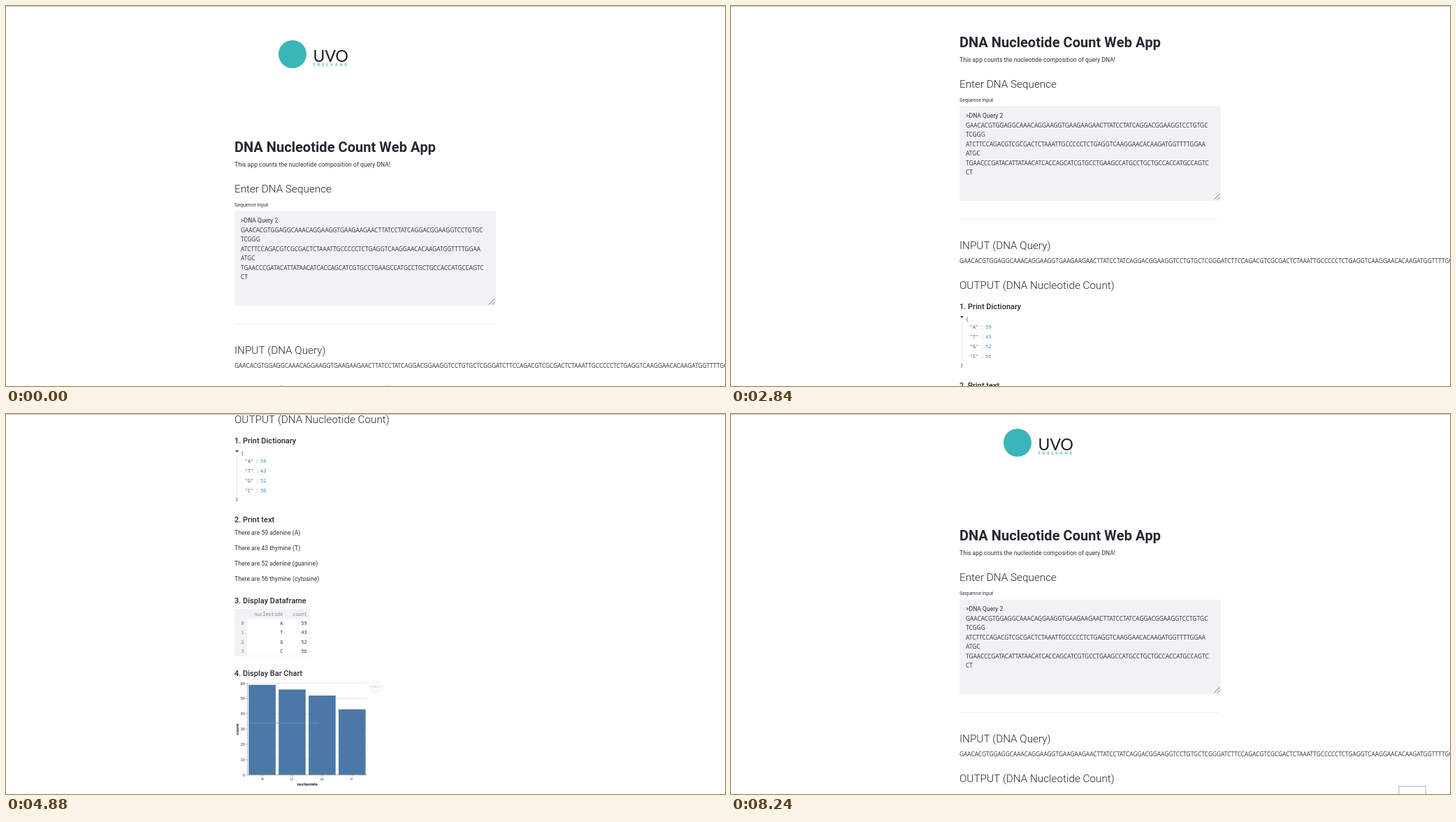
An HTML page that plays this animation: 1029 by 544 pixels, repeating every 8300 ms.

```html
<!DOCTYPE html>
<html lang="en">
<head>
<meta charset="utf-8">
<title>DNA Nucleotide Count Web App</title>
<style>
  html, body { margin: 0; width: 100%; height: 100%; overflow: hidden; background: #fff; }
  svg { display: block; width: 1029px; height: 544px; }
  text { font: 8.57px Roboto, sans-serif; fill: #30313a; font-kerning: none; white-space: pre; }
  .h1 { font-size: 20px; font-weight: 700; letter-spacing: .04px; fill: #262730; }
  .h2 { font-size: 15.3px; font-weight: 300; fill: #262730; }
  .h3 { font-size: 10.9px; font-weight: 500; letter-spacing: .05px; fill: #262730; }
  .label { font-size: 7.05px; }
  .seq { font: 8.33px "Open Sans", sans-serif; }
  .p { letter-spacing: .03px; }
  .mono { font: 6.86px "Noto Sans Mono", monospace; }
  .dim { fill: #7d828c; }
  .key { fill: #4d5358; }
  .num { font: 7.2px "Noto Sans Mono", monospace; }
  .axis { font: 5.4px "Liberation Sans", Arial, sans-serif; fill: #222; }
  .axisTitle { font: bold 5.9px "Liberation Sans", Arial, sans-serif; fill: #111; }
  .brand { font: 23px Lato, sans-serif; fill: #1d1d1f; }
  .tag { font: bold 5.6px Lato, sans-serif; fill: #3ab5b8; letter-spacing: 3px; }
  .end { text-anchor: end; }
  .mid { text-anchor: middle; }
</style>
</head>
<body>
<svg viewBox="0 0 1029 544">
  <rect width="1029" height="544" fill="#fff"/>
  <g id="page"></g>
  <rect id="popup" x="955.8" y="532.8" width="38.4" height="30" fill="#fff" stroke="#c8c8ca" stroke-width="1.5"/>
  <rect width="1029" height="1" fill="#bdbdbf"/>
</svg>
<script>
const NS = 'http://www.w3.org/2000/svg';
const page = document.getElementById('page');
const popup = document.getElementById('popup');
const LOOP = 8300;
const LEFT = 327;

function add(tag, attrs, content) {
  const el = document.createElementNS(NS, tag);
  for (const k in attrs) el.setAttribute(k, attrs[k]);
  if (content !== undefined) el.textContent = content;
  page.appendChild(el);
  return el;
}
const text = (x, y, str, cls, more) => add('text', { x, y, class: cls, ...more }, str);
const rect = (x, y, width, height, fill, more) => add('rect', { x, y, width, height, fill, ...more });
const line = (x1, y1, x2, y2, stroke, width = 1) =>
  add('line', { x1, y1, x2, y2, stroke, 'stroke-width': width });

const lines = [
  'GAACACGTGGAGGCAAACAGGAAGGTGAAGAAGAACTTATCCTATCAGGACGGAAGGTCCTGTGC',
  'TCGGG',
  'ATCTTCCAGACGTCGCGACTCTAAATTGCCCCCTCTGAGGTCAAGGAACACAAGATGGTTTTGGAA',
  'ATGC',
  'TGAACCCGATACATTATAACATCACCAGCATCGTGCCTGAAGCCATGCCTGCTGCCACCATGCCAGTC',
  'CT'
];
const counts = [['A', 59], ['T', 43], ['G', 52], ['C', 56]];
const numbers = [];

function drawHeader() {
  add('circle', { cx: 410, cy: 69, r: 20, fill: '#3ab5b8' });
  text(439.5, 79.8, 'UVO', 'brand');
  text(439.5, 86.2, 'TRELVANE', 'tag');
  text(LEFT, 209, 'DNA Nucleotide Count Web App', 'h1');
  text(LEFT, 230, 'This app counts the nucleotide composition of query DNA!', 'p');
}

function drawInput() {
  text(LEFT, 267, 'Enter DNA Sequence', 'h2');
  text(LEFT, 287, 'Sequence input', 'label');
  rect(LEFT, 293.5, 374, 135.5, '#f0f2f6', { rx: 2 });
  text(336, 310, '>DNA Query 2', 'p');
  lines.forEach((s, i) => text(336, 323.5 + 13.55 * i, s, 'seq'));
  line(691, 427.5, 699.5, 419, '#555', 0.8);
  line(695.5, 427.5, 699.5, 423.5, '#555', 0.8);
  line(LEFT, 455.5, 701, 455.5, '#f0f0f2');
  text(LEFT, 498, 'INPUT (DNA Query)', 'h2');
  text(LEFT, 518, lines.join(''), 'seq');
}

function drawDictionary() {
  text(LEFT, 555, 'OUTPUT (DNA Nucleotide Count)', 'h2');
  text(LEFT, 583.5, '1. Print Dictionary', 'h3');
  add('path', { d: 'M328 594h5l-2.5 3z', fill: '#444' });
  text(336, 600, '{', 'mono');
  line(330.5, 602, 330.5, 659, '#e6e6e8');
  counts.forEach(([base, n], i) => {
    const y = 612 + 14 * i;
    text(342, y, `"${base}"`, 'mono key');
    text(357.7, y, ':', 'mono key');
    numbers.push(text(364, y, n, 'num'));
  });
  text(328.3, 666.3, '}', 'mono');
}

function drawSentences() {
  text(LEFT, 697, '2. Print text', 'h3');
  ['59 adenine (A)', '43 thymine (T)', '52 adenine (guanine)', '56 thymine (cytosine)']
    .forEach((s, i) => text(LEFT, 715 + 22.1 * i, 'There are ' + s, 'p'));
}

function drawTable() {
  text(LEFT, 812.5, '3. Display Dataframe', 'h3');
  rect(327.5, 821.5, 107, 67, '#fff', { stroke: '#f0f2f6' });
  rect(LEFT, 821, 108, 13.5, '#f0f2f6');
  rect(LEFT, 821, 18, 67.5, '#f0f2f6');
  text(396.3, 831, 'nucleotide', 'mono dim end');
  text(430.7, 831, 'count', 'mono dim end');
  counts.forEach(([base, n], i) => {
    const y = 843.9 + 13.4 * i;
    text(340.6, y, i, 'mono dim end');
    text(396.3, y, base, 'mono end');
    text(430.7, y, n, 'mono end');
  });
}

function drawChart() {
  const base = 1058.7, unit = 2.185;
  text(LEFT, 917, '4. Display Bar Chart', 'h3');
  for (let v = 0; v <= 60; v += 10) {
    const y = base - unit * v;
    line(345.5, y, 517, y, '#ddd', 0.8);
    line(342.8, y, 345.5, y, '#888', 0.6);
    text(341.8, y + 1.9, v, 'axis end');
  }
  [...counts].sort((a, b) => b[1] - a[1]).forEach(([name, n], i) => {
    const x = 347.3 + 42.9 * i, mid = x + 19.3;
    rect(x, base - unit * n, 38.6, unit * n, '#4c78a8');
    line(mid, base, mid, base + 2.8, '#888', 0.6);
    text(0, 0, name, 'axis end', { transform: `translate(${mid + 1.9} ${base + 3.9}) rotate(-90)` });
  });
  line(347, 984.2, 429, 984.2, '#6c90b8', 0.9);
  line(433, 984.2, 447, 984.2, '#6c90b8', 0.9);
  line(345.5, base - unit * 60, 345.5, base, '#888', 0.6);
  line(345.5, base, 517, base, '#888', 0.6);
  text(431.2, 1073.8, 'nucleotide', 'axisTitle mid');
  text(0, 0, 'count', 'axisTitle mid', { transform: 'translate(333 993.3) rotate(-90)' });
  add('circle', { cx: 529, cy: 932.5, r: 7.4, fill: '#fff', stroke: '#dedede', 'stroke-width': 0.9 });
  for (const dx of [-3, 0, 3]) add('circle', { cx: 529 + dx, cy: 932.5, r: 0.85, fill: '#999' });
}

// Scroll bursts: start, end, number of steps, then [time, offset] points
const bursts = [
  [1210, 1530, 5, [[1210, 14], [1370, 44], [1530, 53.6]]],
  [1840, 1930, 2, [[1840, 73.5], [1930, 100]]],
  [2220, 2390, 3, [[2220, 112], [2390, 140]]],
  [2840, 3630, 11, [[2840, 150], [3080, 174], [3310, 224], [3630, 342]]],
  [3700, 4170, 7, [[3700, 368], [3940, 456], [4090, 508], [4170, 525]]],
  [4880, 5190, 5, [[4880, 542], [5040, 595], [5190, 617]]],
  [5730, 6490, 11, [[5730, 595], [6490, 85]]],
  [6570, 6800, 4, [[6570, 58], [6650, 40], [6800, 28]]]
];

function between(points, t) {
  if (t <= points[0][0]) return points[0][1];
  for (let i = 1; i < points.length; i++) {
    const [t0, v0] = points[i - 1], [t1, v1] = points[i];
    if (t <= t1) return v0 + (v1 - v0) * (t - t0) / (t1 - t0);
  }
  return points[points.length - 1][1];
}

function scrollAt(t) {
  let pos = 0;
  for (const [start, end, steps, points] of bursts) {
    if (t < start) break;
    const gap = (end - start) / (steps - 1);
    const k = Math.min(steps - 1, Math.floor((t - start + 6) / gap));
    // Land exactly on a point when a step falls next to it
    const at = start + k * gap;
    const near = points.find(p => Math.abs(p[0] - at) < 8);
    pos = near ? near[1] : between(points, at);
  }
  return pos;
}

function render(t) {
  const y = scrollAt(t);
  page.setAttribute('transform', `translate(0 ${-y})`);
  const tint = y < 119 ? '#2fb0ba' : '#3f86bd';
  for (const n of numbers) n.style.fill = tint;
  popup.setAttribute('opacity', t < 8150 ? 0 : t < 8240 ? 0.5 : 1);
}

drawHeader();
drawInput();
drawDictionary();
drawSentences();
drawTable();
drawChart();

function tick() {
  render(performance.now() % LOOP);
  requestAnimationFrame(tick);
}
tick();
</script>
</body>
</html>
```
